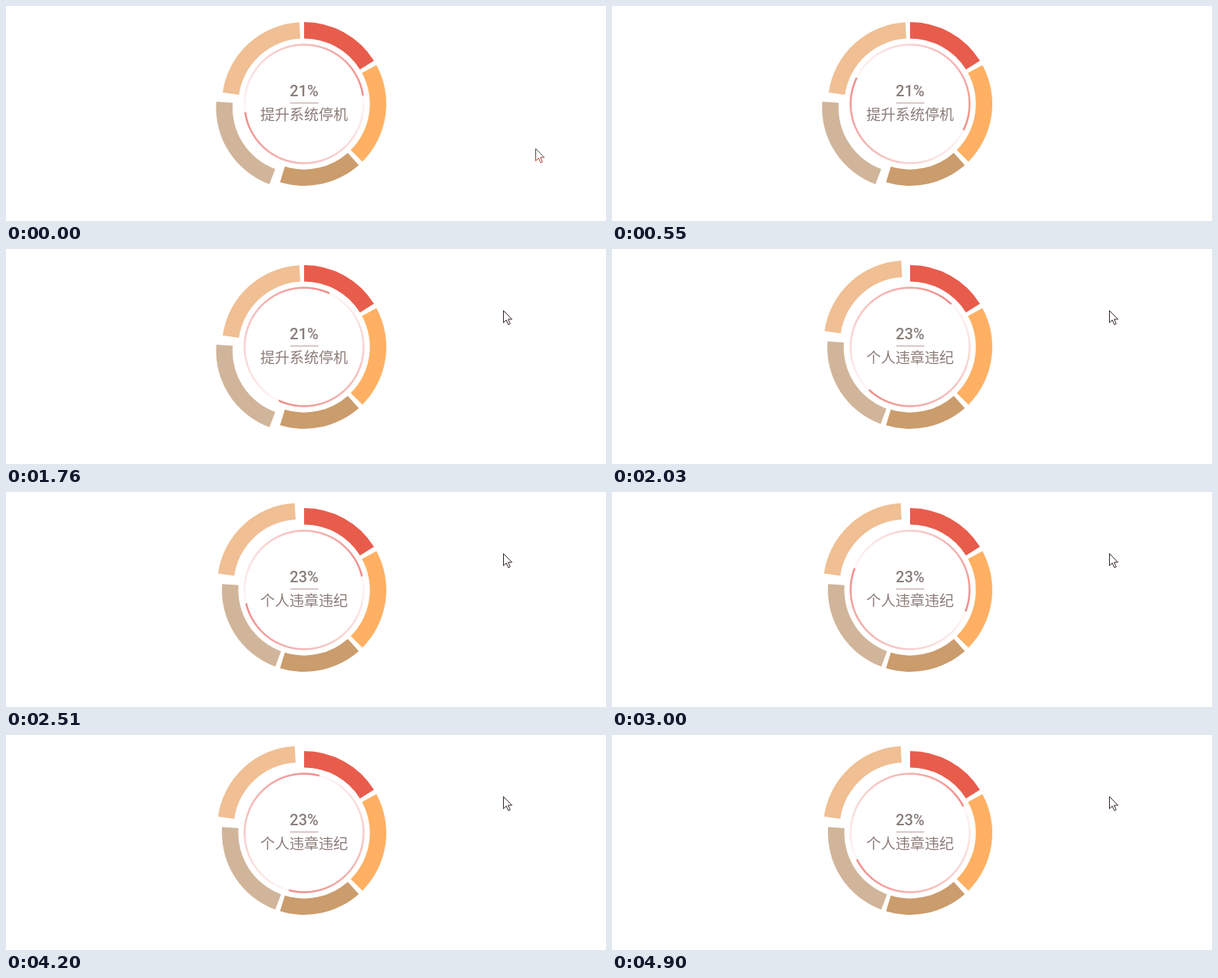
These frames come from a looping animation (781 by 281 pixels, 4.97 s). An HTML page:

```html
<!DOCTYPE html>
<html lang="zh-CN">
<head>
<meta charset="utf-8">
<style>
  html, body { margin: 0; width: 100%; height: 100%; overflow: hidden; background: #fff; }
  svg { position: absolute; left: 0; top: 0; }
  #ring {
    position: absolute; left: 308px; top: 48px; width: 160px; height: 160px; border-radius: 50%;
    background: repeating-conic-gradient(rgba(238, 130, 126, .06) 0deg, rgba(238, 130, 126, .92) 180deg);
    -webkit-mask: radial-gradient(circle closest-side, transparent 75.7px, #000 76.6px, #000 78.2px, transparent 79.1px);
    mask: radial-gradient(circle closest-side, transparent 75.7px, #000 76.6px, #000 78.2px, transparent 79.1px);
  }
  text { text-anchor: middle; }
  #rate { font: 500 20px Roboto, sans-serif; fill: #887e7a; }
  #label { font: 300 19px "Noto Sans CJK SC", "Noto Sans CJK", sans-serif; fill: #8c7c77; }
</style>
</head>
<body>
<div id="ring"></div>
<svg width="781" height="281" viewBox="0 0 781 281">
  <defs>
    <linearGradient id="edge" x1="0" y1="0" x2="0" y2="1">
      <stop offset=".4" stop-color="#454a50"/>
      <stop offset=".75" stop-color="#c0392f"/>
    </linearGradient>
  </defs>
  <g id="pie"></g>
  <text id="rate" x="388" y="118"></text>
  <path d="M370 126.8H406.5" stroke="#cdb8b5" stroke-width="1.5"/>
  <text id="label" x="388" y="149"></text>
  <path id="cursor" d="M.5 .5V16.3L4.2 12.8L6.9 18.8L9.3 17.8L6.7 11.9H11.6Z" fill="#fff"/>
</svg>
<script>
const LOOP = 4970, CX = 388, CY = 128, OUTER = 107, INNER = 85.6, OFFSET = 9;
const SWITCH_AT = 1900, SWITCH_MS = 250, CURSOR_BACK = 1430;

// start angle, end angle (degrees clockwise from the top), colour
const SLICES = [
  [0, 58.2, '#e85c4c'],
  [61.7, 134.8, '#ffb063'],
  [138.3, 197, '#cb9c6c'],
  [200.5, 274.2, '#d1b59a'],
  [278, 356.7, '#f0bf93']
];
// the ring ticks eight times, evenly, between these marks
const MARKS = [70, 630, 1160, 1700, 2230, 2790, 3360, 3920, 4480, 5040];

const $ = id => document.getElementById(id);
const ring = $('ring'), rate = $('rate'), label = $('label'), cursor = $('cursor');

const polar = (r, deg) => {
  const a = deg * Math.PI / 180;
  return [r * Math.sin(a), -r * Math.cos(a)];
};
const at = (r, deg) => {
  const [x, y] = polar(r, deg);
  return `${CX + x} ${CY + y}`;
};

const paths = SLICES.map(([a, b, fill]) => {
  const p = document.createElementNS('http://www.w3.org/2000/svg', 'path');
  p.setAttribute('d', `M${at(OUTER, a)}A${OUTER} ${OUTER} 0 0 1 ${at(OUTER, b)}` +
    `L${at(INNER, b)}A${INNER} ${INNER} 0 0 0 ${at(INNER, a)}Z`);
  p.setAttribute('fill', fill);
  return $('pie').appendChild(p);
});

function pull(i, amount) {
  const [a, b] = SLICES[i];
  paths[i].setAttribute('transform', `translate(${polar(OFFSET * amount, (a + b) / 2)})`);
}

function tick(t) {
  if (t < MARKS[0]) return 0;
  const i = MARKS.findIndex(m => m > t) - 1;
  const step = (MARKS[i + 1] - MARKS[i]) / 8;
  return MARKS[i] + Math.floor((t - MARKS[i] + 6) / step) * step;
}

function placeCursor(x, y, stroke) {
  cursor.setAttribute('transform', `translate(${x} ${y})`);
  cursor.setAttribute('stroke', stroke);
}

function draw(now) {
  const time = now % LOOP, t = tick(time);
  ring.style.transform = `rotate(${82 + t * 0.0697}deg)`;

  const p = Math.min(1, Math.max(0, (t - SWITCH_AT) / SWITCH_MS));
  const eased = 1 - (1 - p) ** 3;
  pull(3, 1 - eased);
  pull(4, eased);

  const second = t >= SWITCH_AT;
  rate.textContent = second ? '23%' : '21%';
  label.textContent = second ? '个人违章违纪' : '提升系统停机';

  cursor.style.display = t < MARKS[0] || t >= CURSOR_BACK ? '' : 'none';
  if (t < MARKS[0]) placeCursor(689, 186, 'url(#edge)');
  else placeCursor(647, 80, '#33242c');
}

const start = performance.now();
function loop() {
  draw(performance.now() - start);
  requestAnimationFrame(loop);
}
loop();
</script>
</body>
</html>
```
